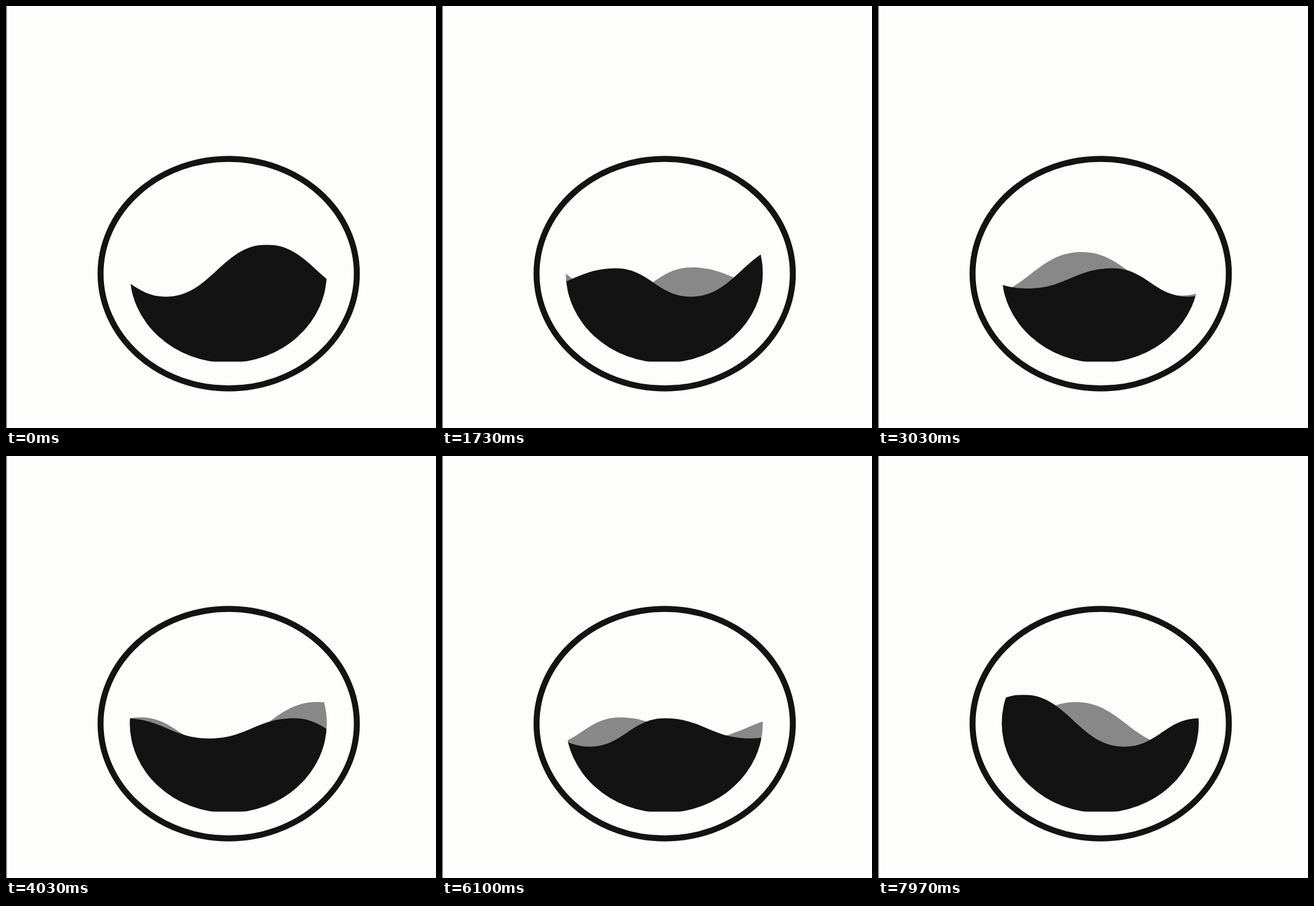
Animation, 755 px wide and 741 px high, one loop 8000 ms. Source, as an HTML page:

```html
<!DOCTYPE html>
<html>
<head>
<meta charset="utf-8">
<style>
  html, body { margin: 0; width: 100%; height: 100%; overflow: hidden; background: #fdfdfb; }
  svg { display: block; width: 755px; height: 741px; }
</style>
</head>
<body>
<svg viewBox="0 0 755 741">
  <clipPath id="flat"><rect x="200" y="419.5" width="380" height="205"/></clipPath>
  <clipPath id="bowl" clip-path="url(#flat)"><ellipse cx="390.3" cy="469" rx="173" ry="157.5"/></clipPath>
  <clipPath id="entered"><rect id="reach" y="400" height="240"/></clipPath>
  <rect width="1.5" height="741" fill="#666"/>
  <g clip-path="url(#bowl)">
    <g clip-path="url(#entered)"><path id="back" fill="#888"/></g>
    <path id="front" fill="#131313"/>
  </g>
  <ellipse cx="391" cy="470" rx="225" ry="201.5" fill="none" stroke="#131313" stroke-width="10.5"/>
</svg>
<script>
const LOOP = 8000, PERIOD = 916, EASE = 0.44, LEFT = 217;
const $ = id => document.getElementById(id);

// Horizontal travel of each wave over time; the back one runs about twice as fast.
const times      = [0, 1730, 3030, 4030, 5230, 6970, 8000];
const frontShift = [0, 156, 263, 357, 467, 613, 716];
const backShift  = [275, 587, 815, 1004, 1234, 1520, 1727];

function travel(shifts, t) {
  let i = 1;
  while (i < times.length - 1 && t > times[i]) i++;
  const k = (t - times[i - 1]) / (times[i] - times[i - 1]);
  return shifts[i - 1] + (shifts[i] - shifts[i - 1]) * k;
}

// One period: high crest, deep trough, low crest, shallow trough, then mirrored.
function wavePath(high, deep, low, shallow) {
  const tile = [[-458, high], [-281, deep], [-149, low], [0, shallow], [149, low], [281, deep]];
  const points = [-1, 0, 1].flatMap(n => tile.map(([x, y]) => [x + n * PERIOD, y]));
  let d = `M${points[0]}`;
  for (let i = 1; i < points.length; i++) {
    const [x0, y0] = points[i - 1], [x1, y1] = points[i], handle = (x1 - x0) * EASE;
    d += `C${x0 + handle},${y0} ${x1 - handle},${y1} ${x1},${y1}`;
  }
  return `${d}V700H${points[0][0]}Z`;
}

$('front').setAttribute('d', wavePath(419, 510.5, 460.5, 496));
$('back').setAttribute('d', wavePath(432, 508.5, 459, 495));

function place(id, shift) {
  $(id).setAttribute('transform', `translate(${shift % PERIOD})`);
}

function draw(now) {
  const t = now % LOOP;
  const back = travel(backShift, t);
  place('front', travel(frontShift, t));
  place('back', back);
  $('reach').setAttribute('width', LEFT + back - backShift[0]);
  requestAnimationFrame(draw);
}
draw(0);
</script>
</body>
</html>
```
